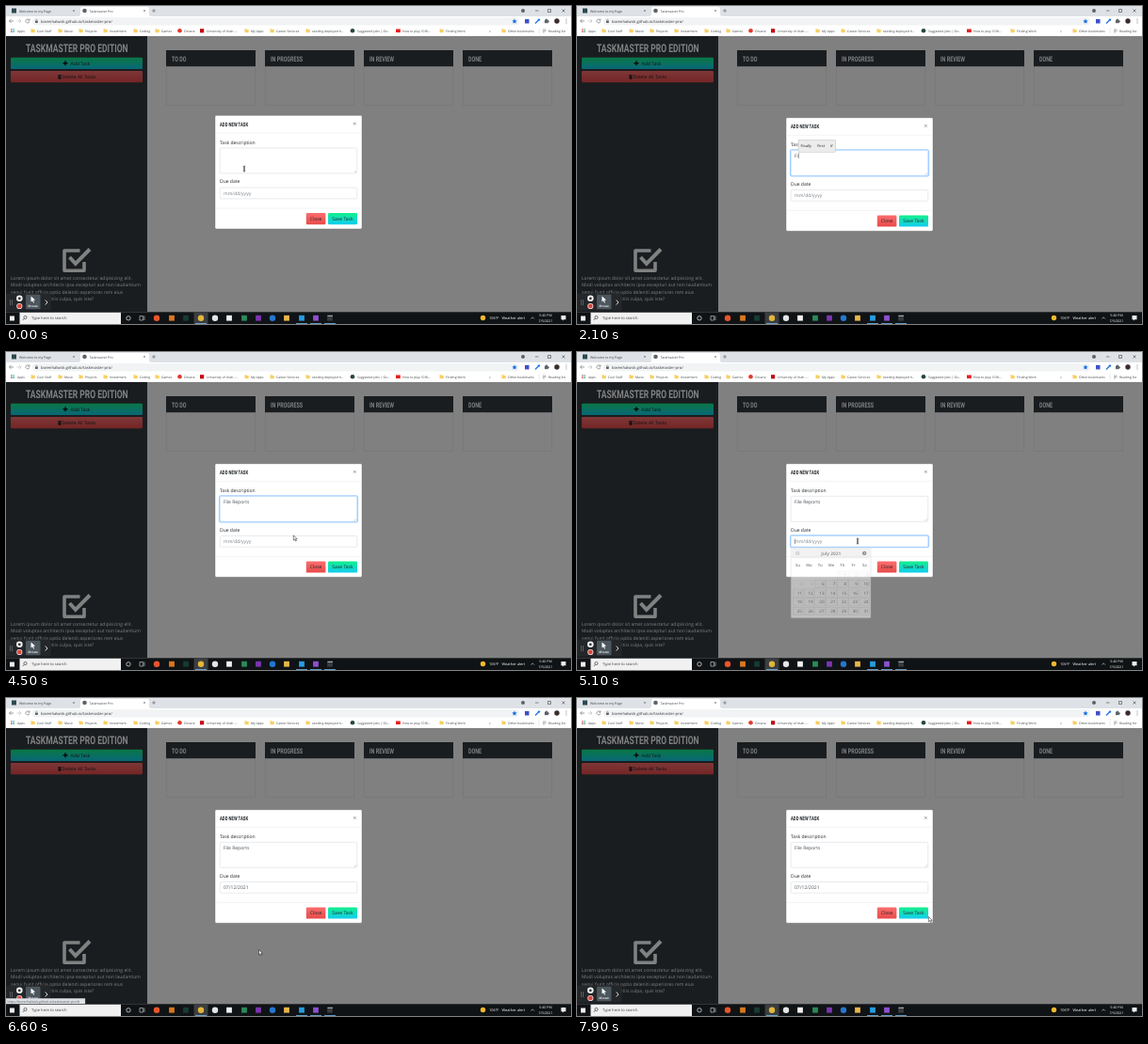
An HTML page that plays this animation: 600 px wide and 338 px high, repeating every 8 s.

```html
<!DOCTYPE html>
<html lang="en">
<head>
<meta charset="utf-8">
<title>Task board</title>
<style>
  html, body { margin: 0; width: 100%; height: 100%; overflow: hidden; background: #808080; }
  svg { display: block; width: 100vw; height: 100vh; }
  text { font-family: "Open Sans", "Noto Sans", sans-serif; text-rendering: geometricPrecision; white-space: pre; }
  .head { font-family: Roboto, "Liberation Sans", sans-serif; font-weight: 600; }
</style>
</head>
<body>
<svg id="stage" viewBox="0 0 600 338" preserveAspectRatio="none"></svg>
<script>
const LOOP = 8000;
const rect = (x, y, w, h, fill, extra = '') =>
  `<rect x="${x}" y="${y}" width="${w}" height="${h}" fill="${fill}" ${extra}/>`;
const dot = (x, y, r, fill, extra = '') => `<circle cx="${x}" cy="${y}" r="${r}" fill="${fill}" ${extra}/>`;
const line = (d, stroke, width = .6, extra = '') =>
  `<path d="${d}" fill="none" stroke="${stroke}" stroke-width="${width}" ${extra}/>`;
const shape = (d, fill, extra = '') => `<path d="${d}" fill="${fill}" ${extra}/>`;
const text = (x, y, size, fill, str, extra = '') =>
  `<text x="${x}" y="${y}" font-size="${size}" fill="${fill}" ${extra}>${str}</text>`;
// Headings share one condensed face.
const heading = (x, y, size, fill, str) =>
  `<text class="head" transform="translate(${x} ${y}) scale(.71 1)" font-size="${size}" fill="${fill}">${str}</text>`;
const group = (id, body, extra = '') => `<g id="${id}" ${extra}>${body}</g>`;
const mid = 'text-anchor="middle"';
const cross = (x, y, r, color) =>
  line(`M${x - r} ${y - r}l${2 * r} ${2 * r}m0 ${-2 * r}l${-2 * r} ${2 * r}`, color, .5);
const folder = (x, y) => shape(`M${x} ${y}h1.6l.6 .6h2v3.4h-4.2z`, '#f7cf62');
const gradient = (id, top, bottom) =>
  `<linearGradient id="${id}" x2="0" y2="1"><stop stop-color="${top}"/><stop offset="1" stop-color="${bottom}"/></linearGradient>`;

const SITE = 'borenhalwick.github.io/taskmaster-pro/';

function browser() {
  const ink = '#5f6368';
  let s = rect(0, 0, 600, 12, '#dee1e6') + rect(0, 11, 600, 21, '#fff');
  s += shape('M77 11q2 0 2-2v-6q0-2 2-2h69q2 0 2 2v6q0 2 2 2z', '#fff');
  s += rect(6, 2.5, 5, 5, '#2b4a52') + text(14, 6.5, 3.5, '#3c4043', 'Welcome to my Page') + cross(72, 5, 1, ink);
  s += dot(83.5, 5, 2.3, '#5f6368') + text(88.5, 6.5, 3.5, '#3c4043', 'Taskmaster Pro') + cross(147, 5, 1, ink);
  s += line('M155 5h4m-2-2v4', ink) + dot(549, 5, 2, '#5f6368');
  s += line('M562 5h3.5M575.5 3.5h3v3h-3z', '#222', .5) + cross(592, 5, 1.5, '#222');
  s += rect(28, 12.3, 517, 8.2, '#f1f3f4', 'rx="4.1"');
  s += line('M8 16h-4.5m2-2l-2 2l2 2', ink) + line('M11.5 16h4.5m-2-2l2 2l-2 2', '#b5b8bb');
  s += line('M24.5 14.7a2 2 0 1 0 .4 1.7M25 13.5v1.7h-1.7', ink);
  s += rect(31, 15.7, 2.8, 2.3, ink) + line('M31.6 16v-1a.8 .8 0 0 1 1.6 0v1', ink, .4);
  s += text(37, 17.6, 4.1, '#303236', SITE);
  s += shape('M540 13.5l.8 1.7 1.8.2-1.3 1.3.3 1.9-1.6-.9-1.6.9.3-1.9-1.3-1.3 1.8-.2z', '#1a73e8');
  s += rect(551, 14, 4.5, 4.5, '#3f51c8') + line('M562 18.5l3.5-3.5', '#1a73e8', 1.3) + dot(566, 14.6, 1.2, '#1a73e8');
  s += rect(572, 14.6, 3.8, 3.6, ink) + dot(574, 14.4, .9, ink) + dot(576, 16.4, .9, ink);
  s += dot(585, 16, 2.7, '#3a2d2c');
  s += [14, 16, 18].map(y => dot(595, y, .5, ink)).join('');

  for (let i = 0; i < 9; i++)
    s += rect(5 + i % 3 * 1.4, 24.3 + (i / 3 | 0) * 1.4, 1, 1, ['#ea5545', '#4285e8', '#35a853'][i % 3]);
  const marks = [[12, 'Apps'], [33, 'Cool Stuff', 1], [62, 'Music', 1], [84, 'Projects', 1], [110, 'Investment', 1],
    [142, 'Coding', 1], [165, 'Games', 1], [189, 'Orvane'], [213, 'University of Utah -...'], [260, 'My Apps', 1],
    [287, 'Career Services', 1], [325, 'seeding deployed h...', 1], [373, 'Suggested Jobs | Ov...'],
    [421, 'How to play 10 Bi...'], [467, 'Finding Work', 1], [513, '»'], [533, 'Other bookmarks', 1], [576, 'Reading list']];
  for (const [x, label, isFolder] of marks)
    s += text(x, 27.6, 3.4, '#3c4043', label) + (isFolder ? folder(x - 6.5, 24.3) : '');
  s += dot(184.5, 26.3, 2.3, '#e03a2c') + rect(206, 24.2, 4.2, 4.2, '#c20c12');
  s += dot(368, 26.3, 2.3, '#25483c') + rect(414, 24.5, 4.8, 3.6, '#e81e1e');
  s += line('M570 25h3.5m-3.5 1.5h3.5m-3.5 1.5h2', ink, .5) + line('M566 23.5v6', '#c8cacd', .4);
  return s;
}

function board() {
  const dim = '#808181';
  let s = rect(0, 32, 600, 293, '#808080') + rect(0, 32, 150, 293, '#1a1d20');
  s += heading(21, 48.5, 12, dim, 'TASKMASTER PRO EDITION');
  s += rect(5, 54.8, 140, 12.2, 'url(#addDim)', 'rx="1.2"') + rect(5, 69, 140, 12.2, 'url(#delDim)', 'rx="1.2"');
  s += line('M60.5 60.7h5m-2.5-2.5v5', '#08090a', 1.4) + text(68.5, 62.6, 5, '#101214', 'Add Task');
  s += shape('M55 73h4v.8h-4zM55.3 74.3h3.4l-.3 3.5h-2.8z', '#101214') + text(59.5, 76.9, 5, '#101214', 'Delete All Tasks');
  s += line('M83 272v9.2h-21v-21.2h16.5', dim, 3.6, 'stroke-linejoin="round"');
  s += line('M67.5 267l6.3 6.8L89 258.5', dim, 4);
  ['Lorem ipsum dolor sit amet consectetur adipisicing elit.',
   'Modi voluptas architects ipsa excepturi aut non laudantium',
   'sequi fugit officia optio deleniti asperiores rem eius',
   'Temporibus blanditiis culpa, quis iste?'
  ].forEach((row, i) => s += text(5, 290.8 + i * 7.4, 5, dim, row));
  ['TO DO', 'IN PROGRESS', 'IN REVIEW', 'DONE'].forEach((name, i) => {
    const x = 170 + 105 * i;
    s += rect(x + .2, 47.2, 94.6, 58.4, 'none', 'stroke="#737373" stroke-width=".5"');
    s += rect(x, 47, 95, 17.2, '#1a1d20') + heading(x + 6, 58.5, 7.6, dim, name);
  });
  return s;
}

function recorder() {
  let s = rect(0, 305.5, 47.5, 18, '#23272a', 'rx="1.5"');
  for (let i = 0; i < 6; i++) s += dot(4.5 + i % 2 * 2, 313 + (i >> 1) * 2, .55, '#a0a3a5');
  s += dot(14.3, 310.8, 3.3, '#f4f4f4') + rect(13.1, 309.6, 2.4, 2.4, '#333');
  s += dot(14.3, 319, 3.1, '#f0d5d3') + dot(14.3, 319, 2.3, '#d8453c');
  s += rect(21, 306.8, 15.5, 15.5, '#4c565d', 'rx="1"');
  s += shape('M26.5 308.5l4.6 4-2.1.3 1.1 2.4-1 .4-1.1-2.4-1.5 1.4z', '#fff');
  s += text(28.7, 320.4, 3.3, '#fff', 'Mouse', mid + ' font-weight="600"');
  return s + line('M41.7 312.5l2.3 2.5-2.3 2.5', '#f0f0f0', .9);
}

function taskbar() {
  let s = rect(0, 325.3, 600, 12.7, '#101315') + rect(4, 329.5, 5, 5, '#f2f2f2');
  s += rect(14.5, 325.8, 107.5, 12.2, '#f1f1f1') + dot(20.5, 331, 1.6, 'none', 'stroke="#222" stroke-width=".6"');
  s += line('M19.3 332.2l-1.6 1.8', '#222') + text(27, 333.3, 4.1, '#444', 'Type here to search');
  s += dot(130, 331.8, 2.2, 'none', 'stroke="#eee" stroke-width=".7"');
  s += line('M142 329.5h3.5v4.5h-3.5zM147 329.5v4.5', '#ddd', .6);
  s += rect(199.5, 325.3, 15, 12.7, '#3b3e40');
  const apps = [[160, 'c', '#e8552d'], [176, 's', '#d9781f'], [191, 's', '#163c32'], [207, 'c', '#e2b63b'], [222, 'c', '#e5e5e5'],
    [237, 's', '#f1f1f1'], [253, 's', '#2a8a58'], [268, 's', '#7b35b2'], [283, 'c', '#2478d0'], [298, 's', '#e9b64a'],
    [314, 's', '#259de0'], [329, 's', '#8d50ce'], [344, 's', '#383c40']];
  for (const [x, kind, color] of apps)
    s += kind === 'c' ? dot(x, 331.7, 3.2, color) : rect(x - 2.9, 328.8, 5.8, 5.8, color);
  s += line('M341.5 329.3h5.5', '#ddd', .8);
  s += [207, 314, 329, 344].map(x => rect(x - 6, 337.2, 12, .8, '#76b9ed')).join('');
  s += dot(506.5, 331.5, 2.7, '#f2b92e') + text(513, 333.1, 3.9, '#fff', '106°F') + text(526.5, 333.1, 3.9, '#fff', 'Weather alert');
  s += line('M557.5 332.5l1.7-1.7 1.7 1.7', '#eee', .6);
  s += text(573, 330.3, 3.6, '#fff', '5:40 PM', mid) + text(573, 336, 3.6, '#fff', '7/5/2021', mid);
  return s + shape('M589.5 329h5v4.3h-2.2l-1.3 1.3v-1.3h-1.5z', '#f1f1f1');
}

const field = (id, y, h) =>
  rect(226.5, y - .5, 147, h + 1, 'none', `id="${id}Glow" rx="1.6" stroke="#a9d1ff" stroke-width="1.2"`) +
  rect(227.2, y, 145.6, h, '#fff', `id="${id}" rx="1.2" stroke-width=".5"`);

function modal() {
  const ink = '#212529';
  let s = rect(222, 118.7, 156, 120.6, '#fff', 'rx="1.4" stroke="#666" stroke-width=".4"');
  s += heading(227, 130.2, 6, ink, 'ADD NEW TASK') + cross(370.3, 127.4, 1.3, '#444');
  s += line('M222 137.3h156M222 217.4h156', '#dee2e6', .4);
  s += text(227, 148.9, 5, ink, 'Task description') + field('note', 153.3, 27);
  s += line('M369.8 179.4l2-2m-.8 2l.8-.8', '#777', .3);
  s += text(227, 190.8, 5, ink, 'Due date') + field('date', 195.4, 11.8);
  s += text(231, 161.1, 5, '#495057', '', 'id="typed"') + text(231, 203.2, 5, '', '', 'id="due"');
  s += rect(0, 0, .4, 5.6, '#222', 'id="caret"');
  s += rect(318.8, 222.4, 20.6, 12.2, 'url(#del)', 'rx="1.2"') + text(329.1, 230.3, 5, ink, 'Close', mid);
  s += rect(342, 222.4, 31, 12.2, 'url(#add)', 'rx="1.2"') + text(357.5, 230.3, 5, ink, 'Save Task', mid);
  return s;
}

function calendar() {
  let s = rect(227.2, 208.2, 84.8, 74.6, '#fff', 'rx="1" stroke="#b5b5b5" stroke-width=".5"');
  s += rect(228.4, 209.3, 82.4, 9.6, '#e6e6e6', 'rx="1" stroke="#cfcfcf" stroke-width=".4"');
  s += text(269.7, 215.7, 4.8, '#333', 'July 2021', mid + ' font-weight="700"');
  s += dot(234.2, 213.9, 2.2, '#a5a5a5') + line('M234.7 212.8l-1.2 1.1 1.2 1.1', '#fff', .6);
  s += dot(305.2, 213.9, 2.2, '#222') + line('M304.7 212.8l1.2 1.1-1.2 1.1', '#fff', .6);
  ['Su', 'Mo', 'Tu', 'We', 'Th', 'Fr', 'Sa'].forEach((d, i) =>
    s += text(234.6 + 11.8 * i, 227.6, 4.2, '#333', d, mid + ' font-weight="700"'));
  for (let day = 1; day <= 31; day++) {
    const slot = day + 3, x = 229.2 + slot % 7 * 11.8, y = 232.8 + (slot / 7 | 0) * 9.6;
    s += `<g opacity="${day < 6 ? .35 : 1}">` +
      rect(x, y, 10.8, 8.4, '#f6f6f6', `${day === 12 ? 'id="pick" ' : ''}stroke="#c5c5c5" stroke-width=".4"`) +
      text(x + 9.7, y + 5.8, 4.5, '#454545', day, 'text-anchor="end"') + '</g>';
  }
  return s;
}

const pointers =
  group('beam', line('M-1.2-3q1.2 0 1.2.8v4.4q0 .8-1.2.8M1.2-3q-1.2 0-1.2.8v4.4q0 .8 1.2.8', '#111', .6)) +
  group('arrow', shape('M0 0v5.4l1.3-1.2.9 2 .9-.4-.9-1.9h1.7z', '#fff', 'stroke="#111" stroke-width=".5"')) +
  group('hand', shape('M-.7.6q.7-1.1 1.4 0v2.3l2.4.7q.7.3.5 1.2l-.6 2.9h-3.4l-2.3-3q.4-1 2 .2z', '#fff', 'stroke="#111" stroke-width=".5"'));

const stage = document.getElementById('stage');
stage.innerHTML = '<defs>' + gradient('add', '#12f08a', '#12cdf0') + gradient('del', '#fb6d6d', '#e84a4a') +
  gradient('addDim', '#097845', '#096778') + gradient('delDim', '#7e3737', '#742525') + '</defs>' +
  browser() + board() + group('modal', modal()) + group('hints', '') + group('calendar', calendar()) + recorder() +
  group('status', rect(0, 319.3, 84, 6.2, '#dee1e6', 'stroke="#b8bbbf" stroke-width=".3"') +
    text(1.5, 323.7, 3.4, '#4a4d51', `https://${SITE}#`)) +
  taskbar() + group('pointer', pointers);

const $ = id => document.getElementById(id);
const el = Object.fromEntries([...stage.querySelectorAll('[id]')].map(n => [n.id, n]));
const show = (node, on) => node.setAttribute('display', on ? 'inline' : 'none');
const clamp = v => Math.max(0, Math.min(1, v));

const NOTE = 'File Reports';
const keyTimes = [1850, 2000, 2250, 2400, 2520, 2700, 2850, 2970, 3100, 3220, 3350, 3500];
const hintWords = { 2: ['Finally', 'First', 'if'], 3: ['File', 'Film', 'Fill'], 4: ['File', 'Files', 'Filed'],
  7: ['Read', 'Really', 'Re'], 8: ['Report', 'Reply', 'Rep'], 9: ['Report', 'Repost'], 10: ['Report', 'Reports'],
  11: ['Report', 'Reports'] };
const CLICK_NOTE = 700, CLICK_DATE = 5000, CLICK_DAY = 6250;

const track = [[0, 253, 173], [150, 253, 173], [650, 286, 161], [3850, 286, 161], [4120, 317, 211], [4300, 316, 209],
  [4500, 305.3, 194.8], [4750, 298, 201], [5350, 298, 201], [5850, 248.8, 260.4], [6150, 248.8, 259], [6350, 248.8, 259],
  [6850, 288, 276.2], [7250, 288, 276.2], [7850, 373.4, 232.5], [LOOP, 373.4, 232.5]];

function pointerAt(t) {
  const i = track.findIndex((k, n) => n && t <= k[0]);
  const [t0, x0, y0] = track[i - 1], [t1, x1, y1] = track[i];
  const u = (t - t0) / (t1 - t0), e = u * u * (3 - 2 * u);
  return [x0 + (x1 - x0) * e, y0 + (y1 - y0) * e];
}
const inside = (x, y, l, top, r, b) => x > l && x < r && y > top && y < b;

function drawHints(count) {
  const words = hintWords[count];
  show(el.hints, words);
  if (!words || el.hints.dataset.count == count) return;
  el.hints.dataset.count = count;
  const left = 231.2 + el.typed.getComputedTextLength();
  el.hints.innerHTML = rect(left, 142.3, 42, 12.9, '#ececec', 'stroke="#b4b4b4" stroke-width=".4"') +
    words.map(w => text(0, 150.4, 3.9, '#222', w)).join('');
  let x = left + 2.5;
  for (const word of el.hints.querySelectorAll('text')) {
    word.setAttribute('x', x);
    x += word.getComputedTextLength() + 6.2;
  }
  el.hints.firstChild.setAttribute('width', x - left - 3);
}

function focusField(id, on) {
  el[id].setAttribute('stroke', on ? '#80bdff' : '#ced4da');
  show(el[id + 'Glow'], on);
}

function render(t) {
  el.modal.setAttribute('transform', `translate(0 ${-2.4 * (1 - clamp(t / 100)) ** 2})`);

  const count = keyTimes.filter(k => k <= t).length;
  const noteFocus = t >= CLICK_NOTE && t < CLICK_DATE, dateFocus = t >= CLICK_DATE && t < CLICK_DAY;
  el.typed.textContent = NOTE.slice(0, count);
  drawHints(t < 3600 ? count : 0);
  focusField('note', noteFocus);
  focusField('date', dateFocus);

  const chosen = t >= CLICK_DAY;
  el.due.textContent = chosen ? '07/12/2021' : 'mm/dd/yyyy';
  el.due.setAttribute('fill', chosen ? '#495057' : '#7b838a');

  const lastInput = dateFocus ? CLICK_DATE : count ? keyTimes[count - 1] : CLICK_NOTE;
  show(el.caret, (noteFocus || dateFocus) && Math.floor((t - lastInput) / 530) % 2 === 0);
  el.caret.setAttribute('x', 231.3 + (noteFocus && count ? el.typed.getComputedTextLength() : 0));
  el.caret.setAttribute('y', noteFocus ? 156.3 : 198.5);

  const fade = clamp((t - CLICK_DATE) / 200) * (1 - clamp((t - CLICK_DAY) / 200));
  el.calendar.setAttribute('opacity', fade);
  show(el.calendar, fade > 0);
  show(el.status, t >= 5650 && t < 7350);

  const [x, y] = pointerAt(t);
  const overField = inside(x, y, 227, 153, 373, 180.5) || inside(x, y, 227, 195.2, 373, 207.5);
  const overDay = fade > 0 && inside(x, y, 229, 242, 311, 280);
  const overButton = inside(x, y, 319, 222.4, 373, 234.6);
  const kind = overDay || overButton ? 'hand' : overField ? 'beam' : 'arrow';
  for (const k of ['beam', 'arrow', 'hand']) show(el[k], k === kind);
  el.pointer.setAttribute('transform', `translate(${x} ${y})`);
  show(el.pointer, t < keyTimes[0] || t >= 3880);
  el.pick.setAttribute('fill', overDay && inside(x, y, 241, 252, 252, 261) ? '#ededed' : '#f6f6f6');
}

const start = performance.now();
function tick() {
  render((performance.now() - start) % LOOP);
  requestAnimationFrame(tick);
}
tick();
</script>
</body>
</html>
```
